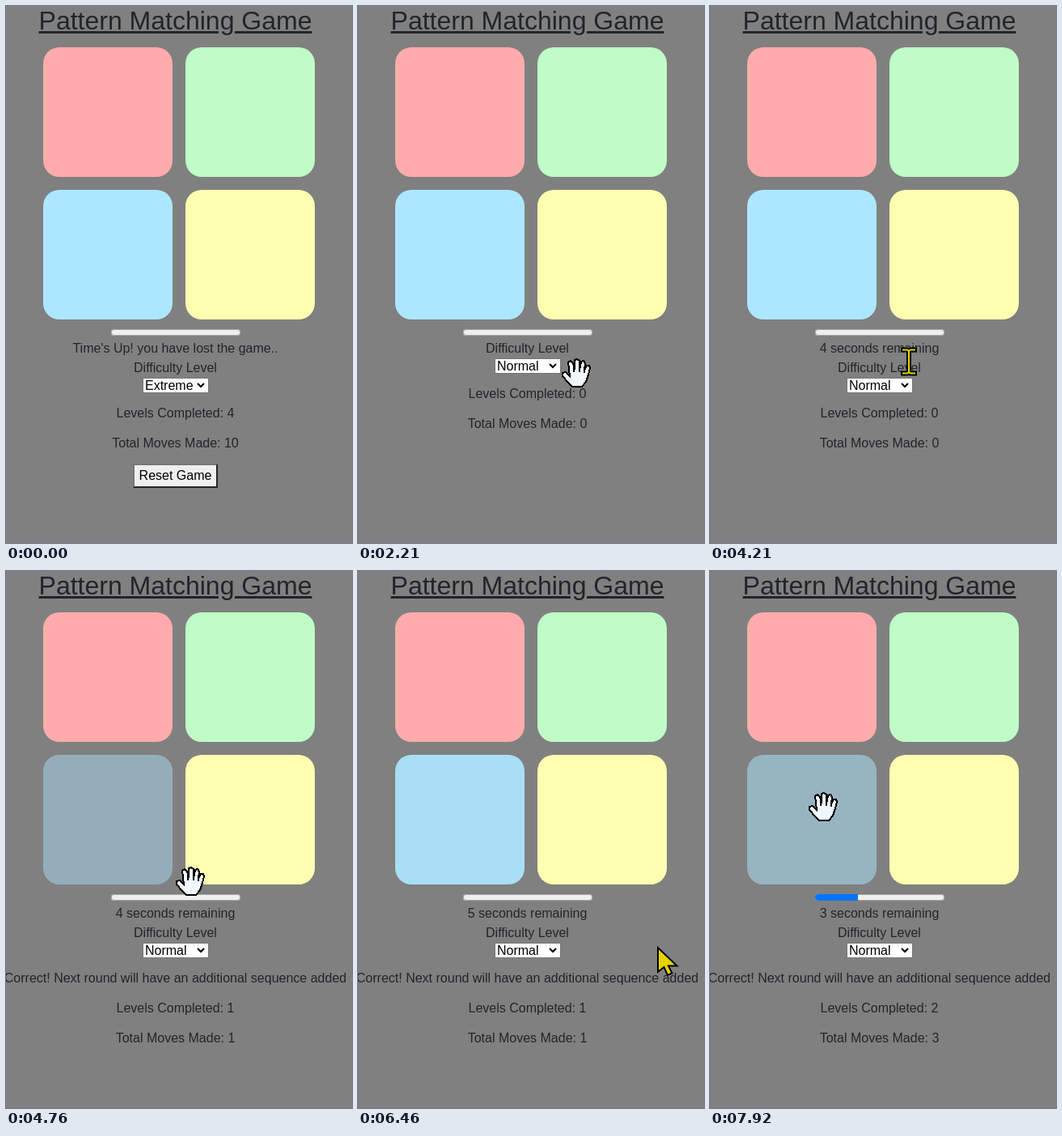
Write an HTML page that moves like this. It is 428 by 663 pixels and loops after 8000 ms.

```html
<!DOCTYPE html>
<html lang="en">
<head>
<meta charset="utf-8">
<title>Pattern Matching Game</title>
<style>
html, body { margin: 0; width: 100%; height: 100%; overflow: hidden; background: #808080; }
body { font: 16px/17px "Liberation Sans", Arial, sans-serif; color: #212529; }
#stage { position: relative; width: 428px; height: 663px; overflow: hidden; }
#stage > * { position: absolute; box-sizing: border-box; }
.line { left: -100px; width: 619px; text-align: center; white-space: nowrap; }
#title { top: 0; font-size: 32px; line-height: 36px; text-decoration: underline; }
.tile { width: 160px; height: 160px; border-radius: 20px; }
#bar { left: 130px; top: 399px; width: 160px; height: 8px; border-radius: 4px;
  background: #efefef; box-shadow: inset 0 0 0 1px #a8a8a8; overflow: hidden; }
#fill { height: 100%; background: #0075ff; }
#select { width: 82px; height: 19px; padding-left: 2px; border: 1px solid #767676;
  background: #fff; color: #000; white-space: nowrap; }
#select svg { position: absolute; right: 4px; top: 5px; }
#start { left: 198px; top: 435px; width: 109px; height: 39px; border-radius: 4px;
  background: #6c757d; color: #fff; text-align: center; line-height: 39px; }
#start.hover { background: #5c636a; }
#reset { left: 156.6px; top: 565px; width: 105.8px; height: 30px; border: 2px solid;
  border-color: #767676 #212529 #212529 #767676; background: #efefef; color: #000;
  text-align: center; line-height: 25px; }
#reset.down { border-color: #212529 #767676 #767676 #212529; background: #f5f5f5; }
#pointer { left: 0; top: 0; width: 428px; height: 663px; }
</style>
</head>
<body>
<div id="stage">
  <div id="title" class="line">Pattern Matching Game</div>
  <div id="red" class="tile" style="left:46px;top:51px;background:#ffabab"></div>
  <div id="green" class="tile" style="left:222px;top:51px;background:#bffcc6"></div>
  <div id="blue" class="tile" style="left:46px;top:227px;background:#ace7ff"></div>
  <div id="yellow" class="tile" style="left:222px;top:227px;background:#fefeb0"></div>
  <div id="bar"><div id="fill"></div></div>
  <div id="status" class="line"></div>
  <div id="label" class="line">Difficulty Level</div>
  <div id="select"><span id="level"></span>
    <svg width="10" height="7"><path d="M1 1L5 5L9 1" fill="none" stroke="#000" stroke-width="2"/></svg>
  </div>
  <div id="start">Start Game</div>
  <div id="note" class="line">Correct! Next round will have an additional sequence added</div>
  <div id="done" class="line"></div>
  <div id="moves" class="line"></div>
  <div id="reset">Reset Game</div>
  <svg id="pointer">
    <path id="arrow" d="M1 2V32L8.500 26L13 36L18.500 33.500L14 24.500H24.500Z"
      fill="#e6d400" stroke="#000" stroke-width="2"/>
    <g id="beam" fill="none">
      <path d="M-10 -14.500H-2L0 -13L2 -14.500H10M0 -14V14M-10 14.500H-2L0 13L2 14.500H10" stroke="#000" stroke-width="6"/>
      <path d="M-8 -14.500H-2L0 -13L2 -14.500H8M0 -14V14M-8 14.500H-2L0 13L2 14.500H8" stroke="#e6d400" stroke-width="2"/>
    </g>
    <g id="hand" fill="#f0f8ff" stroke="#000" stroke-width="2" shape-rendering="crispEdges">
      <path d="M-17 0L-13 -1L-8 4L-10 -13L-7 -15L-4 -12L-2 -4L-2 -16L1 -17L4 -15L4 -4L6 -14L9 -15L11 -12L10 -3L13 -9L16 -9L17 -6L15 2L12 11L7 17H-5L-10 12L-17 4Z"/>
      <path d="M-3 -8V-1M4 -8V-1M10 -6V0" fill="none"/>
    </g>
  </svg>
</div>
<script>
const LOOP = 8000, STEP = 77.1, FIRST = 440;
const $ = id => document.getElementById(id);

// time, x, y, shape
const track = [
  [440, 222, 640, 'arrow'], [520, 214, 608, 'arrow'], [590, 207, 585, 'arrow'], [670, 211, 575, 'arrow'],
  [1520, 211, 575, 'arrow'], [1750, 240, 500, 'arrow'], [1960, 291, 402, 'arrow'],
  [2060, 275, 448, 'hand'], [2210, 270, 453, 'hand'], [2290, 267, 455, 'arrow'],
  [4130, 267, 455, 'arrow'], [4205, 254, 450, 'beam'], [4260, 220, 405, 'arrow'],
  [4320, 190, 365, 'hand'], [4440, 155, 318, 'hand'], [4600, 155, 318, 'hand'],
  [4720, 205, 362, 'hand'], [4760, 230, 384, 'arrow'], [4980, 338, 462, 'arrow'], [5140, 370, 463, 'arrow'],
  [6530, 370, 463, 'arrow'], [6640, 290, 340, 'hand'], [6740, 206, 240, 'hand'],
  [6910, 131, 185, 'hand'], [7080, 124, 148, 'hand'], [7230, 128, 137, 'hand'],
  [7440, 128, 137, 'hand'], [7680, 140, 291, 'hand']
];

const pulses = {
  blue: [3245, 4465, 6420, 7820],
  red: [5492, 7272]
};

function pointerAt(t) {
  let i = track.length - 1;
  while (i > 0 && track[i][0] > t) i--;
  const a = track[i], b = track[i + 1] || a;
  const p = b === a ? 0 : Math.max(0, (t - a[0]) / (b[0] - a[0]));
  return { x: a[1] + (b[1] - a[1]) * p, y: a[2] + (b[2] - a[2]) * p, shape: a[3] };
}

// Swing fade out and back in, 200 ms each way
function opacity(starts, t) {
  const s = starts.find(v => t > v && t < v + 400);
  return s === undefined ? 1 : (1 + Math.cos((t - s) / 200 * Math.PI)) / 2;
}

function stateAt(t) {
  const over = t < 1275, menu = !over && t < 2210;
  const round = t < 4520 ? 0 : t < 7840 ? 1 : 2;
  const left = t < 5525 ? 4 : t < 6840 ? 5 : t < 7685 ? 4 : 3;
  const spent = t < 6840 ? 0 : t < 7685 ? 1 : 2;
  const status = over ? "Time's Up! you have lost the game.."
    : t < 3675 ? '' : left + ' seconds remaining';
  return {
    over, menu, round, status,
    fill: spent / (4 + round),
    done: over ? 4 : round,
    moves: over ? 10 : [0, 1, 3][round]
  };
}

function show(id, on) { $(id).style.display = on ? '' : 'none'; }

function put(id, base, text) {
  $(id).style.top = base - 14 + 'px';
  if (text !== undefined && $(id).textContent !== text) $(id).textContent = text;
}

function draw(t) {
  const s = stateAt(t);
  const q = FIRST + STEP * Math.floor((t - FIRST + 10) / STEP);
  const c = pointerAt(q);

  for (const id in pulses) $(id).style.opacity = opacity(pulses[id], q);
  $('fill').style.width = s.fill * 100 + '%';

  let y = 428;
  show('status', s.status);
  if (s.status) { put('status', y, s.status); y += 24; }
  put('label', y);
  put('select', y + (s.menu ? 30 : 21));
  $('select').style.left = (s.menu ? 112 : 169) + 'px';
  put('level', 0, s.over ? 'Extreme' : 'Normal');
  y += 56;

  const noted = !s.over && s.round > 0;
  show('note', noted);
  if (noted) { put('note', y); y += 37; }
  show('done', !s.menu);
  show('moves', !s.menu);
  put('done', y, 'Levels Completed: ' + s.done);
  put('moves', y + 37, 'Total Moves Made: ' + s.moves);

  show('start', s.menu);
  $('start').className = s.menu && c.shape === 'hand' ? 'hover' : '';
  show('reset', s.over);
  $('reset').className = t >= 820 && t < 895 ? 'down' : '';

  for (const id of ['arrow', 'beam', 'hand']) show(id, q >= FIRST && id === c.shape);
  $(c.shape).setAttribute('transform', `translate(${Math.round(c.x)} ${Math.round(c.y)})`);
}

function tick() {
  draw(performance.now() % LOOP);
  requestAnimationFrame(tick);
}
tick();
</script>
</body>
</html>
```
